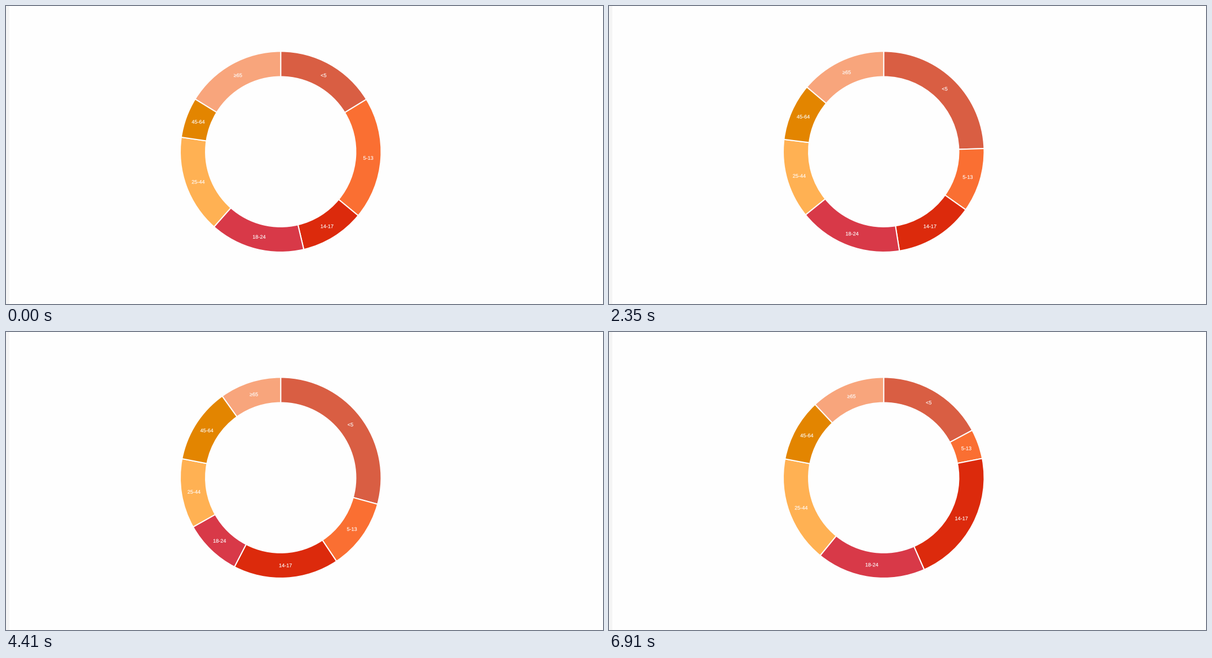
Animation of 1059x529 px, one loop 7360 ms. Source, as a matplotlib script:

```python
import numpy as np
import matplotlib.pyplot as plt
from matplotlib.animation import FuncAnimation
from matplotlib.patches import PathPatch, Rectangle, Wedge
from matplotlib.textpath import TextPath
from matplotlib.transforms import Affine2D

W, H, DPI = 1059, 529, 64
LOOP, TICK = 7360, 20
CX, CY = 487.25, 258.7
R_OUT, R_IN = 178.2, 133.2
R_MID = (R_OUT + R_IN) / 2
STROKE, FONT = 2, 9.1
BG = "#fefefe"

GROUPS = {
    "<5": "#d95e43",
    "5-13": "#fa6f32",
    "14-17": "#dc2a0c",
    "18-24": "#d83948",
    "25-44": "#ffb153",
    "45-64": "#e38500",
    "≥65": "#f8a57c",
}

# Key poses: where each slice but the last ends, degrees clockwise from the top
POSES = np.array([
    [58.6, 129.7, 166.9, 221.6, 278.3, 301.7],
    [47.8, 92.0, 132.4, 219.9, 281.1, 296.7],
    [151.5, 177.5, 231.5, 248.6, 270.7, 331.2],
    [64.2, 118.5, 186.0, 233.6, 290.0, 318.4],
    [61.8, 78.9, 156.2, 219.2, 280.8, 316.9],
])

# Each move between poses: start, first visible refresh, refresh step (ms)
MOVES = [(-110, 0, 170), (1890, 2050, 150), (3890, 4050, 175), (5918, 5960, 150)]
DURATION = 1000


def ease(x):
    """Cubic in-out."""
    x = min(max(x, 0), 1)
    return 4 * x ** 3 if x < 0.5 else 1 - 4 * (1 - x) ** 3


def slice_edges(t):
    k = max(i for i, move in enumerate(MOVES) if move[1] <= t)
    start, first, step = MOVES[k]
    shown = t - (t - first) % step
    p = ease((shown - start) / DURATION)
    inner = POSES[k] + (POSES[k + 1] - POSES[k]) * p
    return np.concatenate(([0], inner, [360]))


def make_wedge(color):
    return ax.add_patch(Wedge((CX, CY), R_OUT, 0, 10, width=R_OUT - R_IN,
                              fc=color, ec=BG, lw=STROKE * 72 / DPI, zorder=2))


def make_label(text):
    path = TextPath((0, 0), text, size=FONT)
    box = path.get_extents()
    path = path.transformed(
        Affine2D().translate(-(box.x0 + box.x1) / 2, -3.3).scale(1, -1))
    return ax.add_patch(PathPatch(path, fc="white", ec="white", lw=0.15,
                                  zorder=3))


plt.rcParams["font.family"] = "Liberation Sans"
fig = plt.figure(figsize=(W / DPI, H / DPI), dpi=DPI, facecolor=BG)
ax = fig.add_axes([0, 0, 1, 1])
ax.set_xlim(0, W)
ax.set_ylim(H, 0)
ax.axis("off")
ax.add_patch(Rectangle((0, 0), 6.3, H, fc="#f5f5f5", lw=0))

wedges = [make_wedge(color) for color in GROUPS.values()]
labels = [make_label(text) for text in GROUPS]


def update(n):
    edges = slice_edges(n * TICK + TICK / 2)
    for wedge, label, a, b in zip(wedges, labels, edges, edges[1:]):
        wedge.set_theta1(a - 90)
        wedge.set_theta2(b - 90)
        mid = np.radians((a + b) / 2)
        shift = Affine2D().translate(CX + R_MID * np.sin(mid),
                                     CY - R_MID * np.cos(mid))
        label.set_transform(shift + ax.transData)
    return wedges + labels


anim = FuncAnimation(fig, update, frames=LOOP // TICK, interval=TICK,
                     init_func=lambda: update(0), repeat=True, repeat_delay=0)
plt.show()
```
